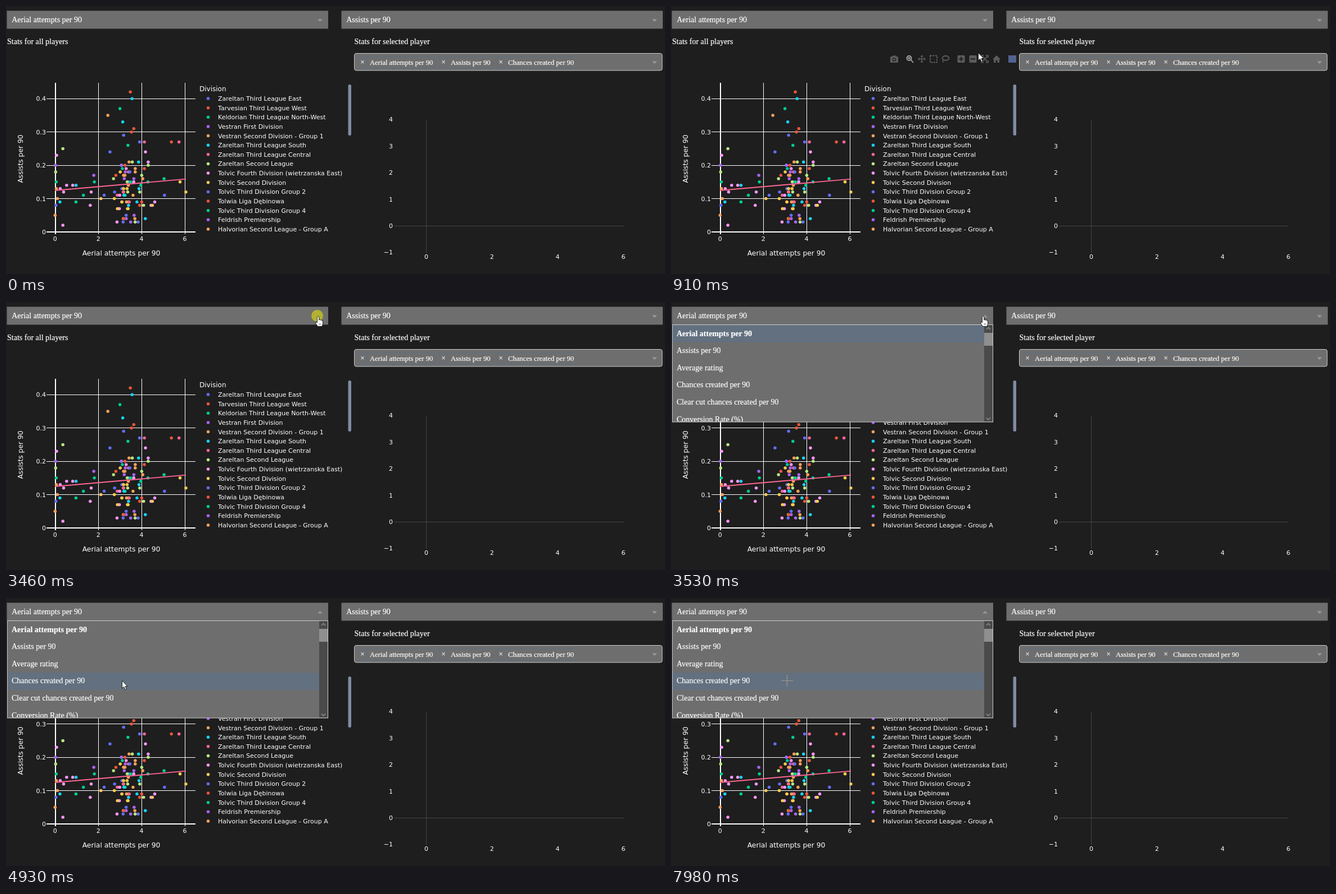
Write an HTML page that moves like this. It is 1172x478 px and loops after 8 s.

```html
<!DOCTYPE html>
<html lang="en">
<head>
<meta charset="utf-8">
<title>Player stats dashboard</title>
<style>
html, body { margin: 0; width: 100%; height: 100%; overflow: hidden; background: #1e1e1e; }
svg { display: block; width: 1172px; height: 478px; }
text { fill: #fff; stroke: #fff; stroke-width: .2px; white-space: pre;
  font: 14px "Liberation Serif", "Times New Roman", serif; }
.chart text { stroke: none; font: 11px "DejaVu Sans", Verdana, sans-serif; }
.chart .axis { font-size: 12.3px; }
.chart .head { font-size: 12px; }
.tag { font-size: 12.6px; }
.bold { font-weight: bold; }
.mid { text-anchor: middle; }
.end { text-anchor: end; }
</style>
</head>
<body>
<svg id="stage" viewBox="0 0 1172 478"></svg>
<script>
const LOOP = 8000;
const BAR = '#6e6e6e';
const COLORS = ['#636efa', '#ef553b', '#00cc96', '#ab63fa', '#ffa15a',
  '#19d3f3', '#ff6692', '#b6e880', '#ff97ff', '#fecb52'];
const [BLUE, RED, GREEN, PURPLE, ORANGE, CYAN, PINK, LIME, MAGENTA, YELLOW] = COLORS;
const LEAGUES = [
  'Zareltan Third League East', 'Tarvesian Third League West',
  'Keldorian Third League North-West', 'Vestran First Division',
  'Vestran Second Division - Group 1', 'Zareltan Third League South',
  'Zareltan Third League Central', 'Zareltan Second League',
  'Tolvic Fourth Division (wietrzanska East)', 'Tolvic Second Division',
  'Tolvic Third Division Group 2', 'Tolwia Liga Dębinowa',
  'Tolvic Third Division Group 4', 'Feldrish Premiership',
  'Halvorian Second League - Group A'];
const OPTIONS = ['Aerial attempts per 90', 'Assists per 90', 'Average rating',
  'Chances created per 90', 'Clear cut chances created per 90', 'Conversion Rate (%)'];
const ROW = 30.65;

const text = (x, y, s, cls = '', more = '') => `<text x="${x}" y="${y}" class="${cls}" ${more}>${s}</text>`;
const rect = (x, y, w, h, fill, more = '') => `<rect x="${x}" y="${y}" width="${w}" height="${h}" fill="${fill}" ${more}/>`;
const path = (d, stroke, w = 1) => `<path d="${d}" fill="none" stroke="${stroke}" stroke-width="${w}"/>`;
const dot = (x, y, fill, r = 2.75) => `<circle cx="${x}" cy="${y}" r="${r}" fill="${fill}"/>`;
const fill = (d, color) => `<path d="${d}" fill="${color}"/>`;

// Data to pixels: attempts across, assists in hundredths upwards.
const px = n => 87.3 + n * 38.45;
const py = n => 403 - n * 5.945;
const point = (x, y, color) => dot(px(x), py(y), color);

let seed = 11;
const rnd = () => (seed = (seed * 16807) % 2147483647) / 2147483647;
const between = (a, b) => a + (b - a) * rnd();
const anyColor = () => COLORS[Math.floor(rnd() * COLORS.length)];

function points() {
  let s = '';
  // a column near zero, a thin spread, then the main cluster
  for (let i = 0; i < 8; i++) s += point(between(0, .12), 5 + Math.round(i * 2.5), anyColor());
  for (let i = 0; i < 12; i++) s += point(between(.2, 2.2), Math.round(between(8, 15)), i % 2 ? MAGENTA : anyColor());
  for (let i = 0; i < 78; i++) {
    const x = 2.25 + 2.45 * (rnd() + rnd()) / 2;
    s += point(x, 3 + Math.floor(19 * rnd() ** 1.2), anyColor());
  }
  // the players who stand out
  const far = [
    [3.48, 42, RED], [3.56, 40, CYAN], [3, 37, GREEN], [2.44, 35, ORANGE], [3.13, 33, CYAN],
    [3.64, 31, RED], [3.53, 30, RED], [3.17, 29, BLUE], [3.91, 27, BLUE], [4.13, 27, PINK],
    [5.38, 27, RED], [5.73, 27, PINK], [3.37, 26, GREEN], [.36, 25, LIME], [2.54, 24, BLUE],
    [4.18, 24, MAGENTA], [1.79, 17, PURPLE], [5.04, 16, GREEN], [5.78, 15, YELLOW],
    [6.05, 12, YELLOW], [5.06, 11, BLUE], [.36, 2, MAGENTA]];
  return s + far.map(f => point(...f)).join('');
}

function scatter() {
  let s = '';
  for (let n = 1; n < 5; n++) s += rect(72, Math.floor(py(n * 10)), 265, 1, '#fff');
  for (let n = 2; n < 7; n += 2) s += rect(Math.floor(px(n)), 137, 1, 270, '#fff');
  s += rect(87, 137, 2, 270, '#fff') + rect(72, 402, 265, 2, '#fff') + points();
  s += path('M87 329L320 308.7', PINK, 1.8);
  for (let n = 0; n < 5; n++) s += text(71, 407 - n * 59.45, n / 10, 'end');
  for (let n = 0; n < 7; n += 2) s += text(px(n), 419, n, 'mid');
  s += text(205, 444.5, OPTIONS[0], 'axis mid');
  s += text(0, 0, OPTIONS[1], 'axis mid', 'transform="translate(30 272.5) rotate(-90)"');
  s += text(344, 152, 'Division', 'head');
  LEAGUES.forEach((name, i) => {
    const y = 165 + i * 16.64;
    s += dot(359.5, y, COLORS[i % 10]) + text(377, y + 4, name);
  });
  return s + rect(608.5, 140, 5.5, 91, '#808ba4', 'rx="2.5"');
}

function emptyChart() {
  let s = rect(747, 203, 1, 237, '#444') + rect(690, 392, 408, 1, '#444');
  for (let n = -1; n < 5; n++) s += text(688, 396 - n * 47.4, n < 0 ? '−1' : n, 'end');
  for (let n = 0; n < 7; n += 2) s += text(747.5 + n * 58.4, 451, n, 'mid');
  return s;
}

const caret = (x, y, up) => fill(up ? `M${x - 4.5} ${y + 2}h9l-4.5 -4.5z` : `M${x - 4.5} ${y - 2}h9l-4.5 4.5z`, '#999');

function tag(x, w, label) {
  const edge = '#5d7085';
  return rect(x, 90.5, w, 20, 'none', `rx="2" stroke="${edge}"`) + path(`M${x + 14} 91v19`, edge)
    + text(x + 6.5, 104, '×', 'tag mid') + text(x + 19.5, 105, label, 'tag');
}

function controls() {
  let s = '';
  [2, 597].forEach((x, i) => s += rect(x - .5, 8.5, 571.5, 32, BAR) + text(x + 8.2, 29, OPTIONS[i]));
  s += caret(1153.5, 25.5);
  s += text(2, 67.5, 'Stats for all players') + text(619.5, 67.5, 'Stats for selected player');
  s += rect(619.5, 84.5, 547.5, 30.5, BAR, 'rx="3.5" stroke="#ccc"') + caret(1153.5, 100.5);
  return s + tag(627.5, 136, OPTIONS[0]) + tag(771.5, 94, OPTIONS[1]) + tag(873.5, 141, OPTIONS[3]);
}

function menu() {
  let s = rect(2.5, 40.5, 570, 173.5, BAR, 'stroke="#ccc"');
  s += rect(3, 41, 554, 31, '#62707f', 'id="hover"') + '<g clip-path="url(#list)">';
  OPTIONS.forEach((o, i) => s += text(10, 60.5 + i * ROW, o, i ? '' : 'bold'));
  s += '</g>' + rect(557, 41, 15, 172, '#4a4a4a') + rect(557, 55, 15, 23, '#8f8f8f');
  return s + path('M561 49l3.5-3.5 3.5 3.5M561 206.5l3.5 3.5 3.5-3.5', '#909090', 1.5);
}

function modebar() {
  const c = '#5c5c5c', hole = '#1e1e1e';
  const ring = (x, y, rx, ry, color) =>
    `<ellipse cx="${x}" cy="${y}" rx="${rx}" ry="${ry}" fill="none" stroke="${color}" stroke-width="1.8"/>`;
  let s = rect(390, 90, 14, 11, c, 'rx="1.5"') + rect(394, 88.5, 6, 3, c);
  s += dot(397, 95.5, hole, 3.2) + dot(397, 95.5, c, 1.9);
  s += ring(423.5, 93, 4, 4, '#aaa') + path('M426.5 96l4.5 5M421.5 93h4M423.5 91v4', '#aaa', 1.8);
  s += path('M440 94.5h12M446 88.5v12', c, 1.5);
  for (let a = 0; a < 360; a += 90)
    s += `<path d="M7 0l-3-3v6z" fill="${c}" transform="translate(446 94.5) rotate(${a})"/>`;
  s += rect(461, 88.5, 12, 12, 'none', `stroke="${c}" stroke-width="2" stroke-dasharray="3 1.5"`);
  s += ring(488.5, 93, 6, 4, c) + path('M484 96q-2 3 1 4.5', c, 1.6);
  for (const x of [516, 537]) s += rect(x - 6.5, 88, 13, 13, c, 'rx="1.5"') + path(`M${x - 4} 94.5h8`, hole, 2);
  s += path('M516 90.5v8', hole, 2);
  s += path('M552 92v-3.5h4M560 88.5h4v3.5M564 97v3.5h-4M556 100.5h-4v-3.5M554 90.5l8 8M562 90.5l-8 8', c, 1.8);
  s += fill('M572 95l7-7 7 7h-2v6h-3.5v-4h-3v4h-3.5v-6z', c);
  return s + rect(600, 88, 14, 13, '#52628f');
}

const cursors = `
<g id="hand"><path d="M-1.5 1.5Q0-1 1.7 1.5V7L3 6.5 4.5 7.3 6 7 7 8.2 8.5 8.5V14L7 18.5H-.5L-4 13.5V10.5L-1.5 11.5Z"
 fill="#fff" stroke="#111" stroke-width=".9"/><path d="M2.2 13v3M4.2 13v3" stroke="#333" stroke-width=".7"/></g>
<g id="arrow"><path d="M.5 .5V14L3.7 11.2 6 16.5 8.3 15.5 6 10.5H10Z" fill="#fff" stroke="#111" stroke-width=".9"/></g>
<g id="cross"><path d="M-10 .5H11M.5-10V11" stroke="#a1978c" stroke-width="1.2"/></g>`;

const stage = document.getElementById('stage');
stage.innerHTML = `<defs><clipPath id="list">${rect(3, 41, 554, 172.5, '#fff')}</clipPath></defs>
<g class="chart">${scatter()}${emptyChart()}</g>${controls()}
<g id="shut">${caret(558.5, 25.5)}</g>
<g id="open">${caret(558.5, 25.5, true)}${menu()}</g>
<g id="tools">${modebar()}</g>
<circle id="click" r="10.5" fill="#b3b12f"/>
<g id="cursor">${cursors}</g>`;

const el = {};
for (const id of ['shut', 'open', 'hover', 'tools', 'click', 'cursor', 'hand', 'arrow', 'cross'])
  el[id] = document.getElementById(id);
const show = (id, on) => { el[id].style.display = on ? '' : 'none'; };
const within = (p, x0, y0, x1, y1) => p.x >= x0 && p.x < x1 && p.y >= y0 && p.y < y1;

// Where the pointer rests or turns.
const STOPS = [
  { t: 300, x: 1151, y: 332 }, { t: 570, x: 547, y: 182 }, { t: 1060, x: 546, y: 18 },
  { t: 1410, x: 555, y: 25 }, { t: 3780, x: 555, y: 25 }, { t: 4590, x: 199, y: 184 },
  { t: 4650, x: 199, y: 184 }, { t: 4920, x: 206, y: 147 }];
const ease = f => f * f * (3 - 2 * f);

function pointer(t) {
  const [from, step] = t < 1500 ? [290, 70] : [3850, 67];
  const q = from + Math.floor((t - from) / step) * step;
  const i = STOPS.findIndex(s => s.t > q);
  if (i < 1) return i ? STOPS[STOPS.length - 1] : STOPS[0];
  const a = STOPS[i - 1], b = STOPS[i], f = ease((q - a.t) / (b.t - a.t));
  return { x: Math.round(a.x + (b.x - a.x) * f), y: Math.round(a.y + (b.y - a.y) * f) };
}

function shape(p, t, open) {
  if (t >= 7980) return 'cross';
  if (within(p, 2, 9, 573, 40) || within(p, 597, 9, 1168, 40)) return 'hand';
  if (open) return 'arrow';
  if (within(p, 344, 157, 600, 406)) return 'hand';
  return within(p, 690, 203, 1098, 440) ? 'cross' : 'arrow';
}

function draw(t) {
  const p = pointer(t), open = t >= 3530, kind = shape(p, t, open);
  const row = open && p.y > 41 ? Math.floor((p.y - 41) / ROW) : 0;
  show('open', open);
  show('shut', !open);
  show('tools', t >= 300 && !open && within(p, 0, 75, 616, 478));
  show('click', (t >= 3460 && t < 3530) || t >= 7910 && t < 7980);
  show('cursor', t >= 300);
  for (const k of ['hand', 'arrow', 'cross']) show(k, k === kind);
  el.hover.setAttribute('y', Math.round(41 + row * ROW));
  el.cursor.setAttribute('transform', `translate(${p.x} ${p.y})`);
  el.click.setAttribute('cx', p.x - (open ? -.5 : 1.5));
  el.click.setAttribute('cy', p.y - (open ? -.5 : .5));
}

const start = performance.now();
function tick() {
  draw((performance.now() - start) % LOOP);
  requestAnimationFrame(tick);
}
tick();
</script>
</body>
</html>
```
